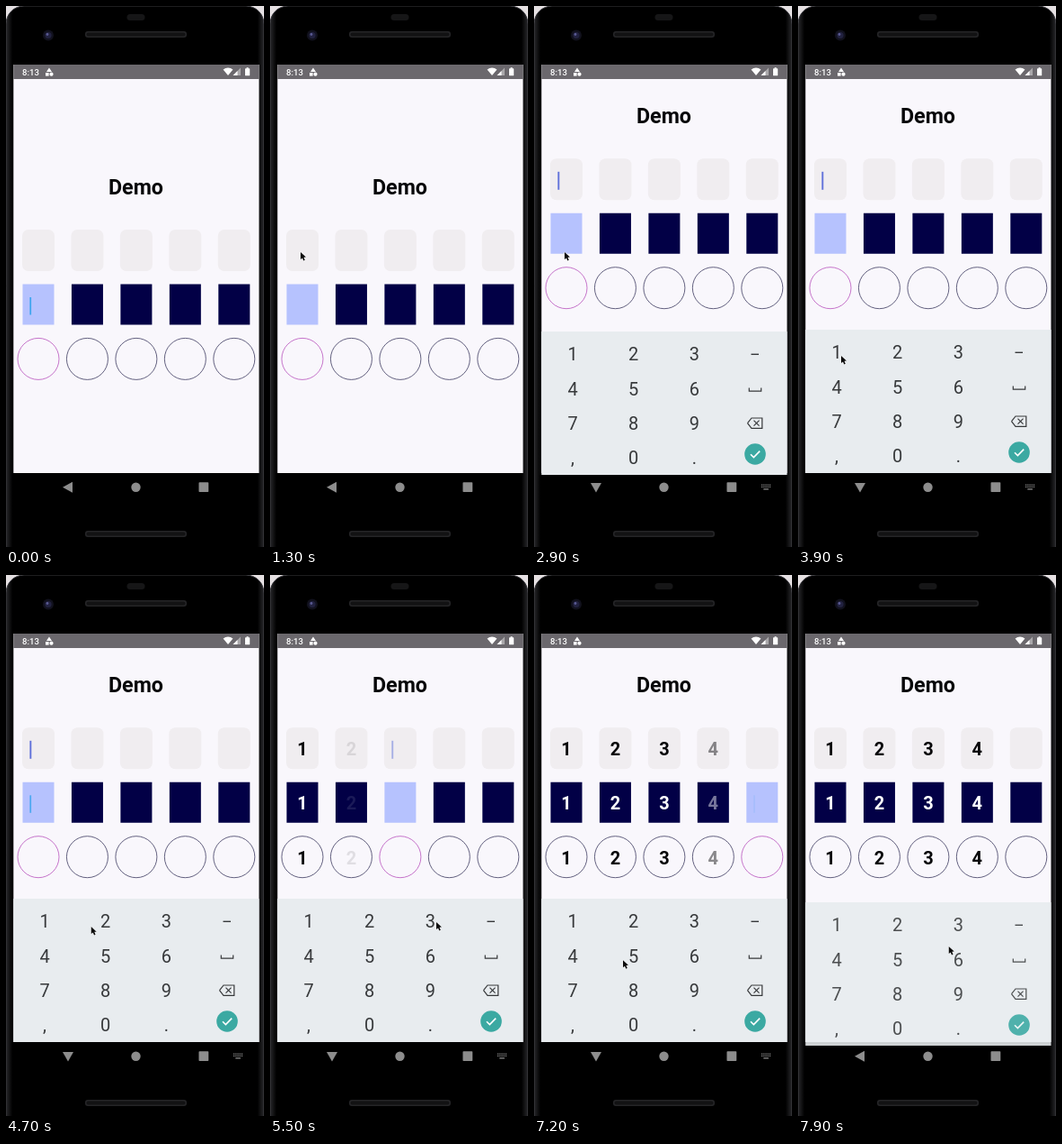
These frames come from a looping animation (287x600 px, 8 s). An HTML page with a canvas:

```html
<!DOCTYPE html>
<html lang="en">
<head>
<meta charset="utf-8">
<title>Code entry demo</title>
<style>
html, body { margin: 0; width: 100%; height: 100%; overflow: hidden; background: #000; }
canvas { display: block; width: 287px; height: 600px; }
</style>
</head>
<body>
<canvas id="stage"></canvas>
<script>
const W = 287, H = 600, LOOP = 8000, STEP = 100;
const canvas = document.getElementById('stage');
const ratio = window.devicePixelRatio || 1;
canvas.width = W * ratio;
canvas.height = H * ratio;
const c = canvas.getContext('2d');

const MID = 144.5, INK = '#08080a', KEY_INK = '#37393b', GRAY = '#8d8d8d';
const clamp = v => Math.max(0, Math.min(1, v));
const mix = (a, b, p) => a + (b - a) * p;
const colX = i => 36 + i * 54.45;
const keyX = i => 43 + i * 67.7;
const keyY = i => 384 + i * 38.3;

// Times when each digit starts to fade in; focus moves on just before.
const typed = [5000, 5470, 6445, 7060, 7900];
const FOCUS_LEAD = 40, FADE = 300;
const TAP = 2600, NAV_OPEN = 2700, KB_OPEN = 2750, LIFT_AT = 2800;
const KB_CLOSE = 7750, NAV_CLOSE = 7850;

// Pointer moves: departure time and destination
const TRAVEL = 400;
const hops = [
  [750, 34, 273], [3500, 48, 388], [4425, 116, 391], [5000, 185, 385],
  [6150, 48, 428], [6900, 116, 427], [7600, 185, 407]
];

function rect(x, y, w, h, color, r = 0) {
  c.fillStyle = color;
  c.beginPath();
  c.roundRect(x, y, w, h, r);
  c.fill();
}

function circle(x, y, r) {
  c.beginPath();
  c.arc(x, y, r, 0, Math.PI * 2);
}

function disc(x, y, r, color) {
  c.fillStyle = color;
  circle(x, y, r);
  c.fill();
}

function trace(points) {
  c.beginPath();
  points.forEach(([x, y]) => c.lineTo(x, y));
}

function poly(points, color) {
  c.fillStyle = color;
  trace(points);
  c.fill();
}

function line(points, color, width) {
  c.strokeStyle = color;
  c.lineWidth = width;
  trace(points);
  c.stroke();
}

function text(s, x, y, size, weight, color, align = 'center') {
  c.font = `${weight} ${size}px Roboto, sans-serif`;
  c.textAlign = align;
  c.fillStyle = color;
  c.fillText(s, x, y);
}

function faded(alpha, draw) {
  if (alpha <= 0) return;
  c.save();
  c.globalAlpha *= alpha;
  draw();
  c.restore();
}

function speaker(y) {
  rect(MID - 56.5, y, 113, 7, '#252527', 3);
  rect(MID - 55, y + 1.5, 110, 4, '#121213', 2);
}

function drawPhone() {
  rect(0, 0, W, H, '#e6e1e3');
  const shade = c.createLinearGradient(0, 0, W, 0);
  [[0, '#29292c'], [0.025, '#000'], [0.975, '#000'], [1, '#29292c']]
    .forEach(([at, color]) => shade.addColorStop(at, color));
  rect(0, 0, W, H + 40, shade, 20);
  c.strokeStyle = '#3a3a3f';
  c.lineWidth = 1;
  c.stroke();
  rect(MID - 10, 9, 20, 7, '#161617', 3.5);
  speaker(28);
  speaker(582);
  disc(47, 32.5, 6, '#11111d');
  disc(47, 32.5, 3.6, '#222240');
  disc(46, 31.5, 1.4, '#5a5a92');
}

function drawStatus() {
  rect(8.3, 65, 273.2, 16, '#6b686d');
  text('8:13', 18, 77, 9.6, 500, '#fff', 'left');
  poly([[48, 68.5], [51, 73], [45, 73]], '#fff');
  rect(44, 74, 3.6, 3.6, '#fff');
  disc(50.5, 75.7, 2.1, '#fff');
  c.fillStyle = '#fff';
  c.beginPath();
  c.moveTo(247, 77);
  c.arc(247, 77, 8.5, -Math.PI * 0.72, -Math.PI * 0.28);
  c.fill();
  poly([[261, 68.5], [261, 77], [252.5, 77]], '#a9a7aa');
  poly([[257.5, 72], [257.5, 77], [252.5, 77]], '#fff');
  rect(266, 69.3, 5.2, 8, '#fff', 0.6);
  rect(267.6, 68.2, 2, 1.5, '#fff');
}

function drawNav(open) {
  poly(open ? [[63, 529], [75, 529], [69, 539.5]] : [[63, 533.7], [74, 527.7], [74, 539.7]], GRAY);
  disc(MID, 533.7, 5.2, GRAY);
  rect(214.5, 528.3, 10.8, 10.8, GRAY, 0.8);
  if (!open) return;
  for (let i = 0; i < 10; i++) rect(253 + i % 5 * 2.2, i < 5 ? 530.5 : 532.7, 1.3, 1.3, GRAY);
  rect(255.3, 535.2, 5.6, 1.3, GRAY);
}

// Caret opacity: a soft-edged pulse once a second
const pulse = (t, peak) => clamp(0.5 + 1.2 * Math.cos((t - peak) * Math.PI / 500));

function drawFields(t) {
  const focus = typed.filter(at => t >= at - FOCUS_LEAD).length;
  // The second row's pulse restarts when its field gains focus.
  const peak = t < LIFT_AT ? 850 : focus === 2 ? 0 : 500;
  c.save();
  c.translate(0, t >= LIFT_AT ? -78.7 : 0);
  text('Demo', MID, 208.7, 23.3, 700, INK);
  for (let i = 0; i < 5; i++) {
    const x = colX(i), on = i === focus;
    rect(x - 18, 248, 36, 46, '#f0edf0', 7);
    rect(x - 17.5, 308.5, 35, 45, on ? '#b6c2fe' : '#020046');
    c.strokeStyle = on ? '#b852bd' : '#3d3a60';
    c.lineWidth = 0.8;
    circle(x, 391.4, 23);
    c.stroke();
    if (on) {
      if (t >= TAP) faded(pulse(t, 750), () => rect(x - 9.6, 262.5, 1.9, 20, '#5f70da'));
      faded(pulse(t, peak), () => rect(x - 9.6, 323, 1.7, 19.5, '#3ba4ee'));
    }
    faded(clamp((t - typed[i]) / FADE), () =>
      [INK, '#fff', INK].forEach((color, row) =>
        text(i + 1, x, 278.8 + row * 60.3, 20, 700, color)));
  }
  c.restore();
}

function drawKeys(t) {
  rect(8.3, 359, 273.2, 159, '#e8ecef');
  [...'123456789,0.'].forEach((key, i) => {
    const x = keyX(i % 3), y = keyY(Math.floor(i / 3));
    // Each key is held briefly before the pointer leaves it.
    const left = i < 5 ? hops[i + 2][0] : LOOP * 2;
    if (t > left - 150 && t <= left) rect(x - 32, y - 17, 64, 34, '#d5dadd', 4);
    text(key, x, y + 7.2, 20, 400, KEY_INK);
  });
  rect(241.5, 383.6, 8.5, 1.4, KEY_INK);
  line([[239.3, 421.5], [239.3, 425.2], [252.7, 425.2], [252.7, 421.5]], KEY_INK, 1.2);
  line([[237.5, 460.7], [242, 455], [253.8, 455], [253.8, 466.4], [242, 466.4], [237.5, 460.7]], KEY_INK, 1.2);
  for (const s of [3, -3]) line([[244.5, 460.7 - s], [250.5, 460.7 + s]], KEY_INK, 1.2);
  disc(246, 495, 11.8, '#3ba9a2');
  line([[241, 495.2], [244.4, 498.6], [251.2, 491.6]], '#fff', 1.6);
}

function drawKeyboard(t) {
  const show = clamp((t - KB_OPEN) / 200);
  const hide = clamp((t - KB_CLOSE) / 300) ** 2;
  c.save();
  c.translate(0, 32 * (1 - show) ** 2 + 16 * hide);
  faded(clamp(show * 1.35) * (1 - 0.45 * hide), () => drawKeys(t));
  c.restore();
}

function drawPointer(t) {
  if (t < hops[0][0]) return;
  let x = 4, y = H;
  for (const [leave, toX, toY] of hops) {
    const p = clamp((t - leave) / TRAVEL);
    x = mix(x, toX, p);
    y = mix(y, toY, p);
  }
  c.save();
  c.translate(x, y);
  const arrow = [[0, 0], [0, 8], [2, 6.4], [3.3, 9.4], [4.8, 8.7], [3.5, 5.8], [6, 5.6], [0, 0]];
  line(arrow, '#fff', 0.8);
  poly(arrow, '#0b0b0b');
  c.restore();
}

function draw(t) {
  c.setTransform(ratio, 0, 0, ratio, 0, 0);
  drawPhone();
  rect(8.3, 65, 273.2, 453, '#f9f7fc');
  drawStatus();
  drawFields(t);
  drawNav(t >= NAV_OPEN && t < NAV_CLOSE);
  drawKeyboard(t);
  drawPointer(t);
}

const start = performance.now();
function tick(now) {
  const t = Math.max(0, now - start) % LOOP;
  draw(Math.floor(t / STEP) * STEP);
  requestAnimationFrame(tick);
}
draw(0);
requestAnimationFrame(tick);
</script>
</body>
</html>
```
